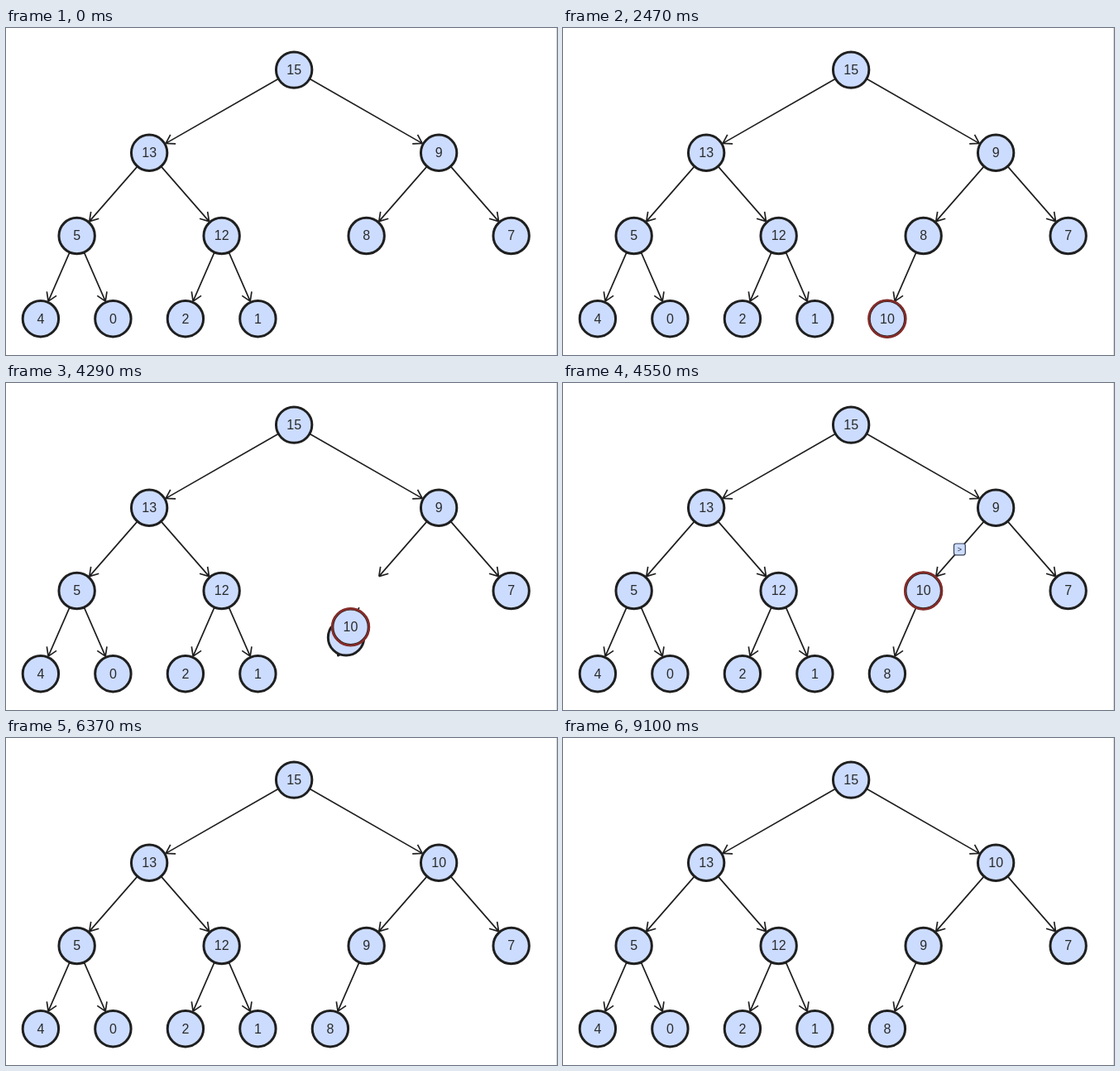
Animation of 666 by 395 pixels, one loop 9.23 s. Source, as an HTML page with a canvas:

```html
<!DOCTYPE html>
<html lang="en">
<head>
<meta charset="utf-8">
<title>Heap insertion</title>
<style>
html, body { margin: 0; width: 100%; height: 100%; overflow: hidden; background: #fff; }
canvas { display: block; }
</style>
</head>
<body>
<canvas id="stage" width="666" height="395"></canvas>
<script>
const ctx = document.getElementById('stage').getContext('2d');
const LOOP = 9230, STEP = 130, SWAP = 435;
const INK = '#1f1f1f', FILL = '#ccdcff', RED = '#842c29';
const heap = [15, 13, 9, 5, 12, 8, 7, 4, 0, 2, 1];
const NEW = 11;

// Centre of a heap slot in a complete binary tree of four levels
function slot(i) {
  const level = Math.floor(Math.log2(i + 1)), k = i + 1 - 2 ** level;
  return { x: 41.9 + 87.5 * ((k + .5) * 2 ** (3 - level) - .5), y: 50.6 + 100.2 * level };
}

const parent = i => (i - 1) >> 1;
const ramp = (t, from, to) => Math.min(1, Math.max(0, (t - from) / (to - from)));
const ease = p => p < .5 ? 4 * p ** 3 : 1 - 4 * (1 - p) ** 3;
const mix = (a, b, p) => ({ x: a.x + (b.x - a.x) * p, y: a.y + (b.y - a.y) * p });
const pulse = (t, on, off) => ramp(t, on, on + 60) * (1 - ramp(t, off, off + 60));

function ring(p, r, width, color) {
  ctx.beginPath();
  ctx.arc(p.x, p.y, r, 0, 2 * Math.PI);
  ctx.lineWidth = width;
  ctx.strokeStyle = color;
  ctx.stroke();
}

function label(text, x, y, size) {
  ctx.font = size + 'px "Liberation Sans", Arial, sans-serif';
  ctx.textAlign = 'center';
  ctx.fillStyle = '#2a2a2a';
  ctx.fillText(text, x, y);
}

function node(value, p, alpha = 1, mark = 0) {
  ctx.globalAlpha = alpha;
  ctx.fillStyle = FILL;
  ctx.beginPath();
  ctx.arc(p.x, p.y, 21, 0, 2 * Math.PI);
  ctx.fill();
  ring(p, 21.7, 3, INK);
  ctx.globalAlpha = alpha * mark;
  ring(p, 22.3, 2.8, RED);
  ctx.globalAlpha = alpha;
  label(value, p.x, p.y + 5.3, 16);
  ctx.globalAlpha = 1;
}

function edge(i, alpha = 1) {
  const a = slot(parent(i)), b = slot(i);
  const angle = Math.atan2(b.y - a.y, b.x - a.x);
  const c = Math.cos(angle), s = Math.sin(angle);
  const tip = { x: b.x - 23 * c, y: b.y - 23 * s };
  ctx.globalAlpha = alpha;
  ctx.strokeStyle = INK;
  ctx.lineWidth = 1.7;
  ctx.beginPath();
  ctx.moveTo(a.x + 22 * c, a.y + 22 * s);
  ctx.lineTo(tip.x, tip.y);
  for (const side of [-.56, .56]) {
    ctx.moveTo(tip.x, tip.y);
    ctx.lineTo(tip.x - 12 * Math.cos(angle + side), tip.y - 12 * Math.sin(angle + side));
  }
  ctx.stroke();
  ctx.globalAlpha = 1;
}

// Comparison sign in the middle of an edge
function badge(i, alpha) {
  if (!alpha) return;
  const m = mix(slot(i), slot(parent(i)), .5);
  ctx.globalAlpha = alpha;
  ctx.beginPath();
  ctx.roundRect(m.x - 6.9, m.y - 6.9, 13.8, 13.8, 2.5);
  ctx.fillStyle = FILL;
  ctx.fill();
  ctx.strokeStyle = '#39415a';
  ctx.lineWidth = 1.2;
  ctx.stroke();
  label('>', m.x, m.y + 3.2, 9);
  ctx.globalAlpha = 1;
}

function draw(t) {
  ctx.fillStyle = '#fff';
  ctx.fillRect(0, 0, 666, 395);
  ctx.fillStyle = '#d6d6d6';
  ctx.fillRect(665, 0, 1, 395);

  const shown = ramp(t, 390, 1040);
  const mark = ramp(t, 1170, 1560) * (1 - ramp(t, 5980, 6370));
  const first = ease(ramp(t, 4063, 4063 + SWAP));
  const second = ease(ramp(t, 5105, 5105 + SWAP));

  for (let i = 1; i < NEW; i++) edge(i);
  edge(NEW, shown);
  badge(11, pulse(t, 3450, 4030));
  badge(5, pulse(t, 4490, 5065));
  badge(2, pulse(t, 5530, 6105));

  heap.forEach((value, i) => {
    let p = slot(i);
    if (i === 5) p = mix(p, slot(11), first);
    if (i === 2) p = mix(p, slot(5), second);
    node(value, p);
  });
  const rising = second ? mix(slot(5), slot(2), second) : mix(slot(11), slot(5), first);
  node(10, rising, shown, mark);
}

const start = performance.now();
function tick() {
  const t = (performance.now() - start) % LOOP;
  draw(Math.floor(t / STEP) * STEP);
  requestAnimationFrame(tick);
}
tick();
</script>
</body>
</html>
```
